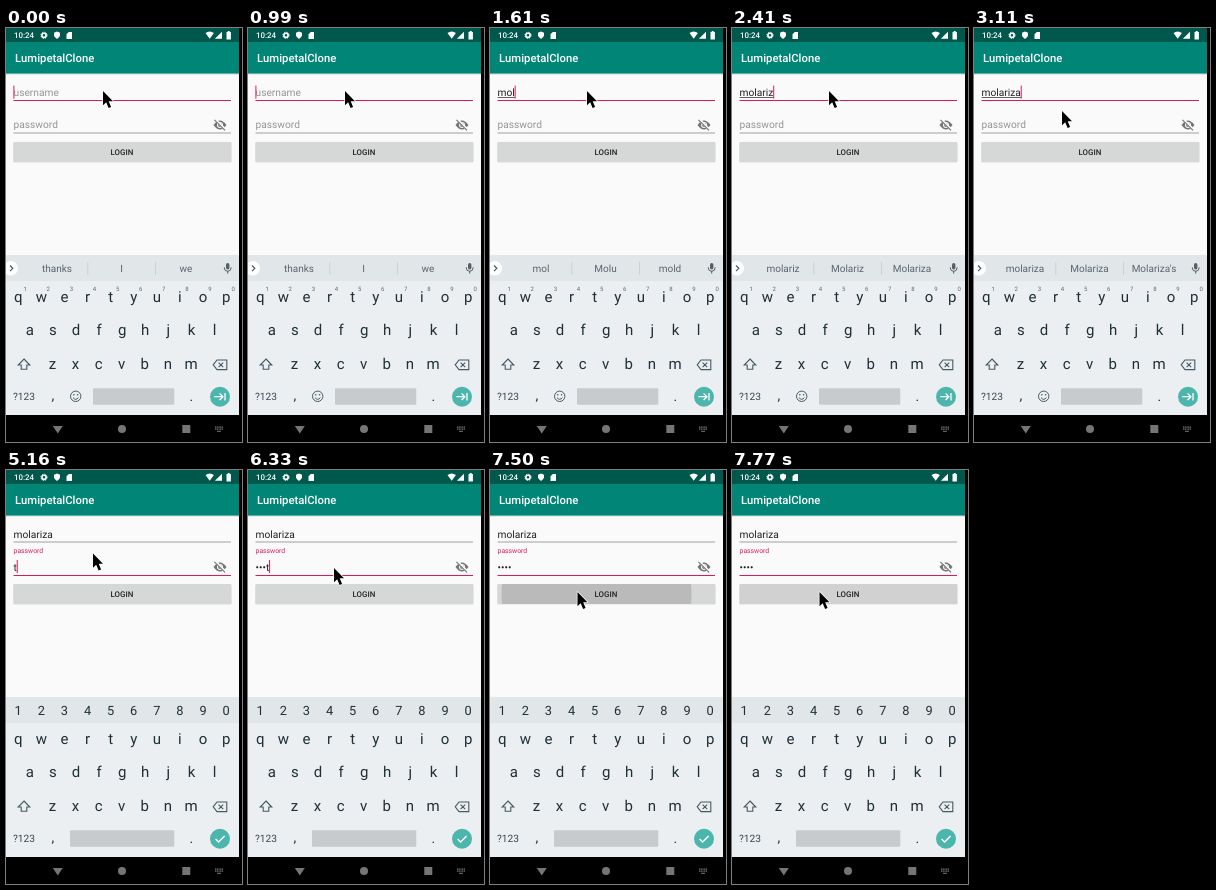
Animation of 236x414 px, one loop 8000 ms. Source, as an HTML page:

```html
<!DOCTYPE html>
<html lang="en">
<head>
<meta charset="utf-8">
<title>Login form</title>
<style>
html, body { margin: 0; width: 236px; height: 414px; overflow: hidden; background: #000; }
svg { display: block; font-family: Roboto, sans-serif; text-rendering: geometricPrecision; }
</style>
</head>
<body>
<svg id="stage" width="236" height="414" viewBox="0 0 236 414"></svg>
<script>
const LOOP = 8000, WIDTH = 233, FIELD = 10.2;
const INK = '#1f2f38', PINK = '#d81b60', TEAL = '#4db6ac', HINT = '#959595';
const USER = 'molariza', PASS = 'test';
const userTimes = [1260, 1440, 1610, 1880, 2050, 2230, 2410, 2770];
const passTimes = [5160, 5430, 5700, 5970];
const caretOff = [[450, 990], [3290, 3640], [4180, 4620], [6510, 7050], [7500, LOOP]];
// Middle and right suggestions after each typed letter
const hints = [['I', 'we'], ['my', 'month'], ['more', 'most'], ['Molu', 'mold'], ['molar', 'mole'],
  ['molar', 'molars'], ['molars', 'Molariza'], ['Molariz', 'Molariza'], ['Molariza', "Molariza's"]];
const pointer = [[0, 97, 63], [2940, 95, 68], [3020, 91, 77], [3110, 88, 83], [3200, 87, 83.5],
  [6330, 86, 98], [6420, 86, 111], [6510, 87, 119], [6600, 87.5, 122]];
const labelMove = [[0, 0], [3640, .3], [3730, .8], [3820, 1]];

const pen = document.createElement('canvas').getContext('2d');
pen.font = '100px Roboto, sans-serif';
const widthOf = s => pen.measureText(s).width * FIELD / 100;
const at = (steps, t) => steps.filter(s => s[0] <= t).pop().slice(1);
const count = (times, t) => times.filter(x => x <= t).length;

const rect = (x, y, w, h, fill, more = '') =>
  `<rect x="${x}" y="${y}" width="${w}" height="${h}" fill="${fill}" ${more}/>`;
const circle = (x, y, r, fill, more = '') => `<circle cx="${x}" cy="${y}" r="${r}" fill="${fill}" ${more}/>`;
const path = (d, fill, more = '') => `<path d="${d}" fill="${fill}" ${more}/>`;
const line = (d, color, w = 1.2) => path(d, 'none', `stroke="${color}" stroke-width="${w}"`);
const text = (s, x, y, size, fill, more = '') =>
  `<text x="${x}" y="${y}" font-size="${size}" fill="${fill}" ${more}>${s}</text>`;
const mid = (s, x, y, size, fill = INK) => text(s, x, y, size, fill, 'text-anchor="middle"');
const bold = 'font-weight="500"';

function header() {
  return rect(0, 0, WIDTH, 414, '#fafafa') + rect(0, 0, WIDTH, 14, '#00574b') +
    rect(0, 45.6, WIDTH, 1, '#000', 'opacity=".12"') + rect(0, 14, WIDTH, 31.6, '#008577') +
    text('10:24', 8, 10.3, 7.9, '#fff', bold) + text('LumipetalClone', 9, 34.2, 11.3, '#fff', bold) +
    circle(38, 7.3, 2.1, 'none', 'stroke="#fff" stroke-width="1.6"') +
    circle(38, 7.3, 3.1, 'none', 'stroke="#fff" stroke-width="1" stroke-dasharray="1.3 1.13"') +
    path('M51 3.5l3 1.2v2.6q-.3 2.5-3 3.7q-2.7-1.2-3-3.7v-2.6z', '#fff') +
    path('M62.8 4h3.2v7h-5.5v-4.7z', '#fff') +
    path('M199.5 5q4.2-3 8.4 0l-4.2 5.8z', '#fff') + path('M216 3.7v7.1h-7.1z', '#fff') +
    path('M220.5 4h1.2v-.9h2v.9h1.2v7.4h-4.4z', '#fff');
}

function eye() {
  return path('M207.5 97q6.5-9 13 0q-6.5 9-13 0z', '#757575') + circle(214, 97, 3, '#fafafa') +
    circle(214, 97, 1.9, '#757575') + line('M208.8 91.2l10.8 10.8', '#fafafa', 2.6) +
    line('M208.4 91.8l10.6 10.6', '#757575');
}

function form(t) {
  const onPass = t >= 3640, typed = USER.slice(0, count(userTimes, t)), n = count(passTimes, t);
  const last = n && t < 7500 ? PASS[n - 1] : '';
  const secret = '•'.repeat(n - last.length) + last;
  const [p] = at(labelMove, t);
  const underline = (y, on) => on ? rect(7.5, y, 217.5, 1, PINK) : rect(7.5, y - .4, 217.5, .8, '#8a8a8a');
  let out = typed ? text(typed, 7.6, 68, FIELD, '#212121') : text('username', 7.6, 68, FIELD, HINT);
  if (typed && !onPass) out += rect(7.6, 69, widthOf(typed), .7, '#212121');
  out += underline(72, t < 3560) + underline(105, t >= 3560);
  out += text('password', 7.6, 100 - 16.7 * p, FIELD - 3.4 * p, p ? PINK : HINT);
  out += text(secret, 7.6, 100.8, FIELD, '#212121') + eye();
  if (!caretOff.some(([a, b]) => t >= a && t < b))
    out += rect(7.4 + widthOf(onPass ? secret : typed), onPass ? 90 : 57.6, 1, 13, PINK);
  return out;
}

function button(t) {
  const fill = t >= 7770 ? '#d0d1d0' : t >= 7590 ? '#bcbdbd' : '#d6d7d7';
  let out = rect(7.3, 114.4, 218.2, 20.2, '#000', 'rx="1" opacity=".12"') +
    rect(7.5, 114, 217.8, 20, fill, 'rx="1"');
  if (t >= 7500 && t < 7590)
    out += '<clipPath id="btn">' + rect(7.5, 114, 217.8, 20, '#000', 'rx="1"') + '</clipPath>' +
      circle(106.5, 124, 95, '#b9bab9', 'clip-path="url(#btn)"');
  return out + text('LOGIN', 104.6, 127, 7.9, '#212121', bold);
}

function keyboard(t) {
  const digits = t >= 3730, n = count(userTimes, t), col = i => 12.2 + 23.1 * i;
  let out = rect(0, 227, WIDTH, 161, '#eceff1') + rect(0, 227, WIDTH, 26, '#e1e6e9');
  if (digits) {
    [...'1234567890'].forEach((d, i) => out += mid(d, col(i), 245.3, 12.8));
  } else {
    [USER.slice(0, n) || 'thanks', ...hints[n]].forEach((s, i) => out += mid(s, 51 + 64.5 * i, 244, 10, '#5a666c'));
    out += rect(81.5, 234, .7, 13, '#c3cacd') + rect(149, 234, .7, 13, '#c3cacd') +
      circle(4.8, 240.3, 7.2, '#fff') + line('M4 237.5l2.8 2.8l-2.8 2.8', '#455a64') +
      rect(220, 235, 3.4, 6.5, '#546168', 'rx="1.7"') +
      line('M218.2 239.3q0 4 3.5 4t3.5-4M221.7 243v2.6', '#546168', 1);
  }
  [['qwertyuiop', 0, 274], ['asdfghjkl', .5, 307], ['zxcvbnm', 1.48, 341]].forEach(([keys, shift, y]) =>
    [...keys].forEach((k, i) => {
      out += mid(k, col(i + shift), y, 15);
      if (y == 274 && !digits) out += mid((i + 1) % 10, col(i) + 7, 263, 6, '#5f6b71');
    }));
  out += line('M18 331l5.8 6h-3v4.3h-5.6v-4.3h-3z', '#455a64', 1.1) +
    line('M211 332h9.8v9.6h-9.8l-3.8-4.8zM212.6 334.6l4.6 4.6m0-4.6l-4.6 4.6', '#455a64', 1.1) +
    mid('?123', 18, 372.3, 10.2, '#37474f') + mid(',', 46.8, 372, 14) + mid('.', 185.3, 372.5, 14);
  if (!digits)
    out += circle(69.7, 368.3, 5.2, 'none', 'stroke="#455a64"') + circle(67.8, 366.8, .8, '#455a64') +
      circle(71.6, 366.8, .8, '#455a64') + line('M67 369.6q2.7 3.4 5.4 0', '#455a64', 1);
  const left = digits ? 64 : 87;
  out += rect(left, 360.3, 168.3 - left, 16.4, '#c7cbcd', 'rx="1"') + circle(214, 368.7, 10, TEAL);
  return out + line(digits ? 'M209.6 369l3 3l6-6' : 'M208.3 368.7h8.5m-3.2-3.3l3.3 3.3l-3.3 3.3M219 365v7.4', '#fff', 1.3);
}

function navBar() {
  return rect(0, 387, 236, 27, '#000') + path('M46.8 398h10l-5 7.4z', '#757575') + circle(116, 401, 4, '#757575') +
    rect(176.3, 397, 8, 8, '#757575') +
    path('M209 399.2h8M209 401.2h8', 'none', 'stroke="#757575" stroke-width="1.2" stroke-dasharray="1.2 .5"') +
    rect(211, 402.8, 4, 1, '#757575');
}

function cursor(t) {
  const [x, y] = at(pointer, t);
  return path('M0 0V14.2L3.2 11.2L5.6 17L8.1 15.9L5.7 10.3H10Z', '#000',
    `transform="translate(${x} ${y})" stroke="#fff" stroke-width="1.4" stroke-linejoin="round" paint-order="stroke"`);
}

const stage = document.getElementById('stage');
let shown = '';
function frame() {
  const t = performance.now() % LOOP;
  const scene = header() + form(t) + button(t) + keyboard(t) + navBar() + cursor(t);
  if (scene !== shown) stage.innerHTML = shown = scene;
  requestAnimationFrame(frame);
}
frame();
</script>
</body>
</html>
```
